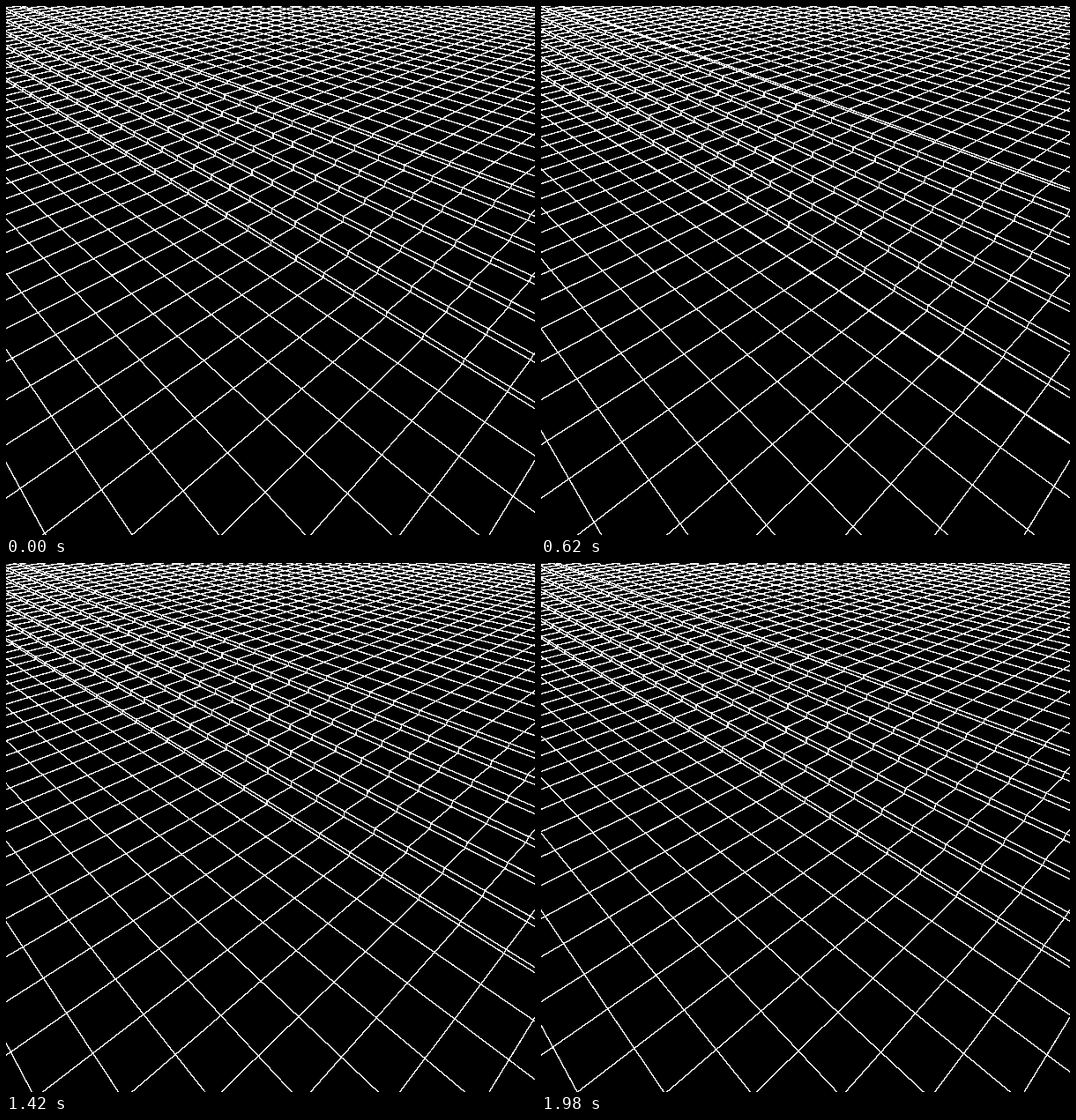
An HTML page for the animation above (2000 ms loop, 600x600 px).

```html
<!DOCTYPE html>
<html>
<head>
<meta charset="utf-8">
<style>
html, body { margin: 0; height: 100%; overflow: hidden; background: #000; }
svg { display: block; width: 600px; height: 600px; }
path { fill: none; stroke: #fff; stroke-width: 1.4; shape-rendering: crispEdges; }
</style>
</head>
<body>
<svg viewBox="0 0 600 600"><path id="grid"/></svg>
<script>
// An endless escalator: rows of unit tiles travel along p and climb a ramp.
// Units are tiles, measured from the point on the floor below the camera.
const FOCAL = 300 / Math.tan(Math.PI / 6), CAM_HEIGHT = 8;
const TILT = 0.7, YAW = 0.77;
const PERIOD = 500, STEP_MS = 20;
const P_START = -2.58, Q_START = -1.37, COUNT = 56;
const RAMP_START = 6.57, RAMP_LENGTH = 6.5, RISE = 1.25;

const { sin, cos } = Math;
const sy = sin(YAW), cy = cos(YAW), st = sin(TILT), ct = cos(TILT);
const grid = document.getElementById('grid');

function project(p, q, z) {
  const side = p * cy - q * sy, ahead = p * sy + q * cy, drop = CAM_HEIGHT - z;
  const scale = FOCAL / (ahead * ct + drop * st);
  const x = 300 + side * scale;
  const y = 300 + (drop * ct - ahead * st) * scale;
  return x.toFixed(2) + ' ' + y.toFixed(2);
}

// Height of the tread whose near edge is at p
function height(p) {
  const along = Math.min(Math.max(p - RAMP_START, 0), RAMP_LENGTH);
  return along / RAMP_LENGTH * RISE;
}

function outline(phase) {
  const first = P_START + phase, last = first + COUNT;
  const qEnd = Q_START + COUNT;
  const profile = [[first, 0]];
  let d = '';
  const across = (p, z) => {
    d += 'M' + project(p, Q_START, z) + 'L' + project(p, qEnd, z);
  };
  for (let i = 0; i <= COUNT; i++) {
    const p = first + i, low = height(p - 1), high = height(p);
    across(p, low);
    if (high > low) {
      across(p, high);
      profile.push([p, low], [p, high]);
    }
  }
  profile.push([last, RISE]);
  for (let i = 0; i <= COUNT; i++) {
    d += 'M' + profile.map(([p, z]) => project(p, Q_START + i, z)).join('L');
  }
  return d;
}

const start = performance.now();
function draw() {
  const t = Math.max(0, performance.now() - start);
  const phase = Math.floor(t / STEP_MS) * STEP_MS % PERIOD / PERIOD;
  grid.setAttribute('d', outline(phase));
  requestAnimationFrame(draw);
}
draw();
</script>
</body>
</html>
```
